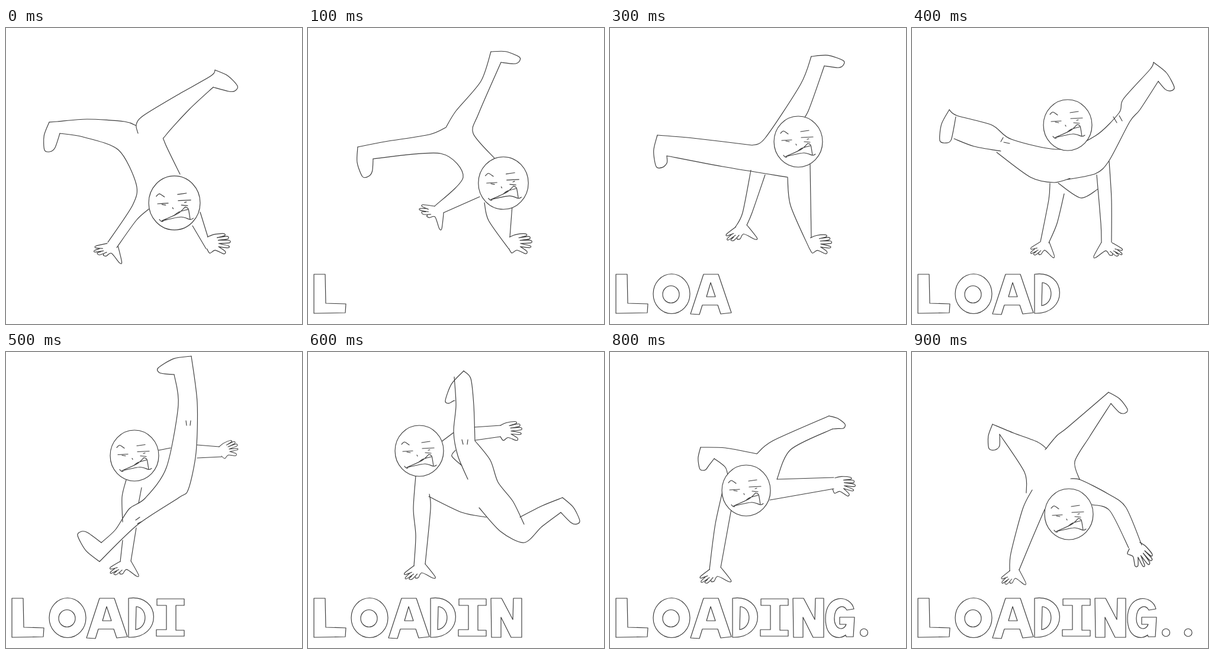
Animation, 500 px wide and 500 px high, one loop 1000 ms. Source, as an HTML page:

```html
<!DOCTYPE html>
<html lang="en">
<head>
<meta charset="utf-8">
<title>Loading</title>
<style>
html, body { margin: 0; width: 100%; height: 100%; overflow: hidden; background: #fff; }
svg { display: block; width: 100vw; height: 100vh; }
path, ellipse { fill: none; stroke: #3c3c3c; stroke-width: 1.15; stroke-linecap: round; stroke-linejoin: round; }
.head { fill: #fff; }
</style>
</head>
<body>
<svg id="stage" viewBox="0 0 500 500" role="img" aria-label="LOADING.."></svg>
<script>
const NS = 'http://www.w3.org/2000/svg';
const STEP = 100;
const stage = document.getElementById('stage');
const figures = [];

function add(parent, tag, attrs) {
  const el = document.createElementNS(NS, tag);
  for (const k in attrs) el.setAttribute(k, attrs[k]);
  return parent.appendChild(el);
}

// Smooth curve through points
function curve(p) {
  let d = 'M' + p[0];
  for (let i = 0; i < p.length - 1; i++) {
    const a = p[i - 1] || p[i], b = p[i], c = p[i + 1], e = p[i + 2] || c;
    const c1 = b.map((v, k) => v + (c[k] - a[k]) / 7);
    const c2 = c.map((v, k) => v - (e[k] - b[k]) / 7);
    d += `C${c1} ${c2} ${c}`;
  }
  return d;
}

// Strokes are split by "/"
const sketch = text => text.split('/')
  .map(s => curve(s.trim().split(/\s+/).map(q => q.split(',').map(Number)))).join('');

const FACE = sketch(`-11,-12 -6,-16 2,-11 / 23,-15 37,-17 / -9,0 8,-1 / -2,1 4,2 / 24,-5 44,-6
  / 34,-2 37,-3 / 29,2 39,3 / 15,6 16,8 / -6,25 -3,28 0,28 / -2,27 24,15 35,5
  / 35,5 40,8 43,25 / -2,27 28,21 43,25 48,23 / 18,18 25,13 39,9`);

// Wrist at the origin: one hand flat on the floor, one spread sideways
const FLOOR = sketch(`-9.5,1 -25,13 -24,16 -13,12 / -17,14 -24,21 -22,23 -10,15
  / -13,18 -18,23 -13,24 -4,15 / -7,20 -7,22 -2,21 4,13 23,22 26,19 9.5,-2`);
const SPREAD = sketch(`0,-9.5 10,-14 25,-16 27,-13 15,-9 / 15,-9 31,-12 32,-8 17,-5
  / 17,-5 34,-6 35,-2 18,0 / 18,0 34,3 33,6 18,5 / 18,5 29,12 27,16 13,11 5,16 0,9.5`);

const place = (d, x, y, turn, sx, sy) =>
  ({ d, transform: `translate(${x} ${y}) rotate(${turn}) scale(${sx} ${sy})` });
const floor = (x, y, turn = 0, sx = 1) => place(FLOOR, x, y, turn, sx, 1);
const spread = (x, y, turn = 0, size = 1, flip = 1) => place(SPREAD, x, y, turn, size, size * flip);

// Foot outline from heel h round toe t to ankle front f; w is the toe width
function foot(hx, hy, tx, ty, fx, fy, w) {
  const dx = tx - hx, dy = ty - hy, len = Math.hypot(dx, dy);
  const ux = dx / len, uy = dy / len;
  const side = Math.sign(ux * (fy - hy) - uy * (fx - hx));
  const at = (along, out) => [hx + ux * along - uy * out * side, hy + uy * along + ux * out * side];
  return { d: curve([[hx, hy], at(len / 2, -len / 10), at(len, 0), at(len + 1, w * .6), at(len - 7, w), [fx, fy]]) };
}

function pose(x, y, faceY, lines, parts, size = 1) {
  const g = add(stage, 'g', { visibility: 'hidden' });
  add(g, 'path', { d: sketch(lines) });
  parts.forEach(part => add(g, 'path', part));
  add(g, 'ellipse', { class: 'head', cx: x, cy: y, rx: 41 * size, ry: 43 * size });
  add(g, 'path', { d: FACE, transform: `translate(${x - 19} ${y + faceY}) scale(${size})` });
  figures.push(g);
}

pose(284.5, 295.5, 1.5, `73,159 87,158 137,154 200,158 220,165
  / 223,178 220,163 232,148 288,114 346,81 353,71 / 350,100 310,137 270,181 268,193 294,247
  / 91,178 130,184 190,206 220,264 214,299 172,362 / 187,371 220,325 241,306
  / 315,334 338,373 / 328,311 341,353`,
  [foot(73, 159, 65, 206, 91, 178, 17), foot(353, 71, 391, 98, 350, 100, 16),
   floor(180, 367, 25), spread(340, 363, 3, 1.07)], 1.06);

pose(330, 262, 0, `309,40 292,90 250,140 233,168 / 233,168 205,180 130,192 84,201
  / 326,58 288,145 279,178 315,220 / 110,221 224,212 262,252 214,301
  / 229,312 290,285 / 298,295 305,325 339,373 / 345,300 341,353`,
  [foot(309, 40, 357, 49, 326, 58, 13), foot(84, 201, 92, 251, 110, 221, 18),
   floor(221, 307, 45), spread(340, 363, 3, 1.05)], 1.03);

pose(375, 228, -1, `265,15 258,70 247,153 238,178 185,203 125,233 97,235
  / 287,26 285,90 287,153 / 287,153 315,168 339,179 / 123,249 200,232 256,216
  / 256,216 300,247 308,258 304,321 / 304,321 330,370 / 341,258 324,320 336,357
  / 339,179 345,143 / 345,143 313,130 302,133 / 313,115 362,126 368,135 364,186`,
  [foot(265, 15, 322, 12, 287, 26, 11), foot(97, 235, 123, 292, 123, 249, 22),
   spread(335, 364, 3), spread(306, 124, -100, .85, -1)]);

pose(318, 192, -2, `340,48 322,95 262,186 240,198 / 240,198 140,186 80,181
  / 96,216 190,234 300,252 / 362,64 335,140 318,165 / 238,240 224,312 212,336
  / 262,248 240,312 231,333 / 300,252 305,300 337,373 / 338,230 340,354`,
  [foot(340, 48, 394, 55, 362, 64, 13), foot(80, 181, 78, 234, 96, 216, 18),
   floor(222, 335), spread(338, 364, 3)]);

pose(263, 164, -6, `63,138 76,148 135,164 168,188 250,205 310,182 350,143 357,120 402,70 408,58
  / 416,90 385,138 368,158 333,224 310,246 262,256 / 267,254 240,261 200,252 143,210
  / 71,187 105,200 150,208 / 154,185 150,192 / 155,193 165,195 / 340,150 346,160 / 350,148 355,157
  / 247,262 285,287 314,272 / 233,262 231,290 217,361 / 257,280 245,330 231,363
  / 312,248 319,330 320,362 / 333,225 337,290 337,362`,
  [foot(63, 138, 47, 190, 74, 150, 18), foot(408, 58, 443, 100, 416, 90, 14),
   floor(224, 362, 12, .8), floor(329, 363, -8, -.95)]);

pose(217, 175, -1.5, `313,7 323,85 321,170 308,232 292,246 222,292 158,354
  / 284,38 291,90 271,195 235,247 208,265 185,300 161,322
  / 304,116 305,124 / 312,116 311,124 / 219,284 226,279 / 222,290 230,286
  / 203,216 196,245 197,287 / 197,318 193,354 / 229,229 224,255 / 220,297 211,353
  / 258,166 278,162 / 323,157 360,160 / 323,179 364,177`,
  [foot(313, 7, 257, 27, 284, 38, 13), foot(158, 354, 121, 310, 161, 322, 16),
   floor(202, 354, 8, .95), spread(362, 168, -15, .85)]);

pose(188, 167, 1, `263,32 275,45 280,90 282,150 / 282,150 308,183 321,220 346,252 365,291
  / 247,42 250,90 246,135 253,175 270,215 / 289,263 325,303 365,322 395,295 427,271
  / 358,279 395,260 430,246 / 260,148 262,156 / 270,148 269,156 / 204,244 260,271 301,279
  / 182,209 178,265 182,310 179,361 / 205,240 207,265 198,358
  / 226,151 246,136 / 281,127 325,124 / 283,149 325,143 / 249,166 243,176 260,192`,
  [foot(263, 32, 232, 82, 248, 82, 12), foot(430, 246, 459, 285, 427, 271, 14),
   floor(188.5, 360), spread(325, 133.5)]);

pose(194, 191.5, -1.5, `240,152 270,186 / 268,187 333,162 413,165 / 418,188 340,196 272,234
  / 272,234 266,270 265,294 / 220,248 237,295 260,316 281,309 / 265,285 277,284 290,295
  / 204,248 232,247 / 207,147 215,125 247,88 286,43 / 302,53 274,95 240,152
  / 174,230 171,255 181,320 180,361 / 208,242 198,300 199,358`,
  [foot(418, 188, 436, 142, 413, 165, 14), foot(290, 295, 298, 323, 281, 309, 14),
   floor(190, 360), spread(294, 48, -60)]);

pose(230, 234, -1, `248,172 275,150 370,108 / 376,130 305,165 282,215
  / 248,172 195,162 153,161 / 176,180 195,195 200,215 / 195,215 178,290 168,367
  / 205,265 187,364 / 282,215 378,212 / 270,250 378,231`,
  [foot(370, 108, 397, 122, 376, 130, 12), foot(153, 161, 152, 198, 176, 180, 15),
   floor(178, 366), spread(378, 222, 12)]);

pose(265, 274, 2, `136,122 172,137 212,152 227,163 / 225,165 245,141 262,128 332,68
  / 336,87 300,143 275,185 283,215 / 148,139 190,203 193,238
  / 203,233 187,265 167,340 165,370 / 224,266 203,315 181,368
  / 268,214 285,216 330,239 361,262 388,326 / 304,258 334,268 366,331`,
  [foot(136, 122, 130, 163, 148, 139, 17), foot(332, 68, 364, 97, 336, 87, 13),
   floor(173, 369, 5, .8), spread(376, 327, 58, 1.1)]);

const oval = (x, y, rx, ry) => `M${x - rx} ${y}a${rx} ${ry} 0 1 1 ${2 * rx} 0a${rx} ${ry} 0 1 1 ${-2 * rx} 0`;
const dot = x => oval(x, 474, 6.5, 6.5);
const letters = [
  'M10 416H29L30 465L64 466L63 481L10 482Z',
  oval(104, 449, 31, 33.5) + oval(103, 450, 14, 14.5),
  'M158 416H183L205 481L187 483L182 468H156L151 484L136 483ZM170 430L163 454H178Z',
  'M207 416C262 408 265 484 207 482ZM220 430C240 432 240 466 219 469Z',
  'M255 417H301V428H287V470H301V480H254V469H271V428H255Z',
  'M309 416H327L346 452L347 416H361V482H343L326 448V482H310Z',
  'M412 434C406 409 364 408 364 450C364 484 388 487 398 478L399 481H411L413 448H388V460H399C394 473 378 468 379 449C380 428 396 426 400 436Z',
  dot(429), dot(466.5)
].map(d => add(stage, 'path', { d, visibility: 'hidden' }));

const show = (el, on) => el.setAttribute('visibility', on ? 'visible' : 'hidden');
const start = performance.now();
let last = -1;

function draw(now) {
  const n = Math.floor(Math.max(0, now - start) / STEP) % figures.length;
  if (n !== last) {
    figures.forEach((g, i) => show(g, i === n));
    letters.forEach((p, i) => show(p, i < n));
    last = n;
  }
  requestAnimationFrame(draw);
}
draw(start);
</script>
</body>
</html>
```
